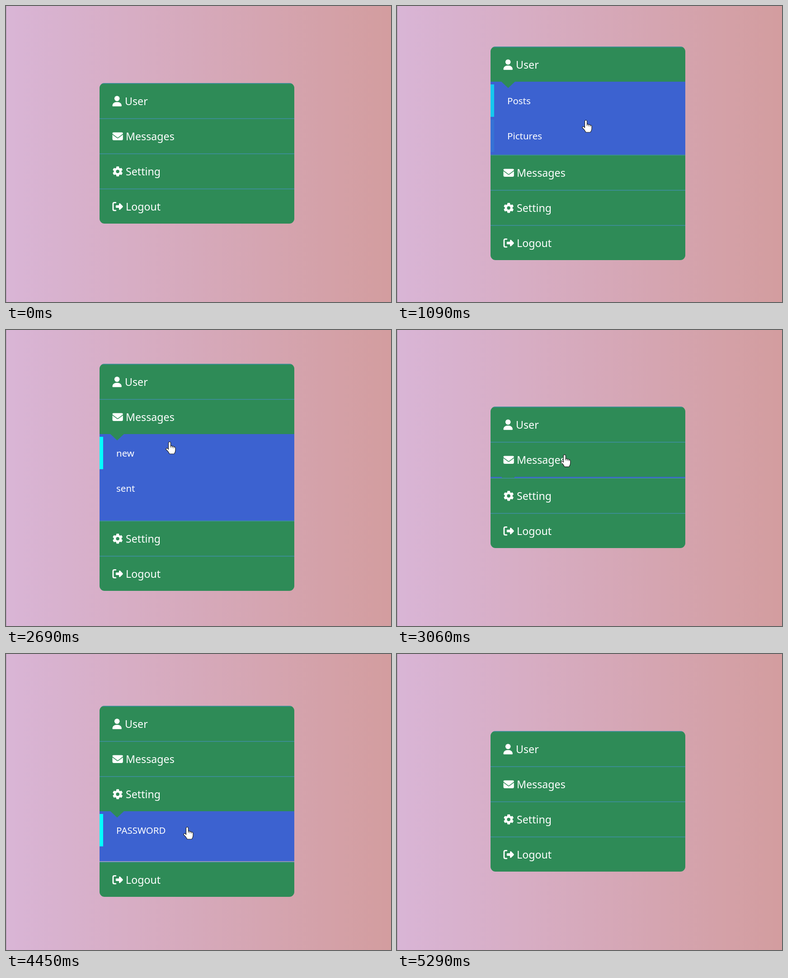
Recreate the animation shown at these times as an HTML page with a canvas. Size 852 px wide and 657 px high, loop 6.07 s.

```html
<!DOCTYPE html>
<html lang="en">
<head>
<meta charset="utf-8">
<title>Accordion menu</title>
<style>
  html, body { margin: 0; width: 100%; height: 100%; overflow: hidden; }
  canvas { display: block; }
</style>
</head>
<body>
<canvas id="stage" width="852" height="657"></canvas>
<script>
const ctx = document.getElementById('stage').getContext('2d');
const LOOP = 6070, STEP = 10;
const LEFT = 207, WIDTH = 431, MIDDLE = 327, ROW = 78;
const MAX_HEIGHT = 230, SLIDE = 500, FADE = 200, GAP = 6;
const GREEN = '#2e8b57', BLUE = '#3c62d0', LINE = '#4190aa';

const menu = [
  { label: 'User', icon: drawUser, textX: 263, items: ['Posts', 'Pictures'], open: 720, close: 1675 },
  { label: 'Messages', icon: drawEnvelope, textX: 265, items: ['new', 'sent', 'spam'], open: 1675, close: 2622 },
  { label: 'Setting', icon: drawGear, textX: 265, items: ['PASSWORD', 'LANGUAGE'], open: 3592, close: 4300 },
  { label: 'Logout', icon: drawExit, textX: 265, items: [], open: 0, close: 0 }
];

// Pointer hot spot: time, x, y
const pointerPath = [
  [120, 714, 613], [680, 423, 203], [900, 423, 210], [1040, 418, 248], [1090, 418, 253],
  [1130, 418, 262], [1500, 438, 381], [2000, 438, 381], [2520, 362, 248], [2900, 362, 248],
  [3560, 398, 365], [3680, 402, 380], [3710, 406, 405], [3850, 406, 402], [4250, 401, 384],
  [4700, 401, 384], [5140, 531, 518], [5290, 800, 695]
];

const hand = new Path2D('M-2.5 2Q0-2 2.5 2V10Q4.500 7.500 6 10.500Q8.500 9 9.500 11.500Q12 10.500 13 14V19Q13 23 10 27H0Q-3 21-8 17Q-7.500 13-4 15L-2.500 17Z');
const arrow = new Path2D('M0 0V20L4.500 16L8 24L11.500 22.500L8.500 15H14Z');
const userBody = new Path2D('M178 304C80 304 0 384 0 482Q0 512 30 512H418Q448 512 448 482C448 384 368 304 270 304Z');
const flap = new Path2D('M48 64C21 64 0 85 0 112Q0 136 19 150L237 314Q256 326 275 314L493 150Q512 136 512 112C512 85 490 64 464 64Z');
const envelope = new Path2D('M0 176V384Q0 448 64 448H448Q512 448 512 384V176L294 339Q256 365 218 339Z');
const exitArrow = new Path2D('M320 192V130Q324 96 354 96Q368 97 378 106L501 229Q522 256 501 283L378 406Q368 415 354 416Q324 416 320 382V320H192Q160 320 160 288V224Q160 192 192 192Z');
const bracket = new Path2D('M160 64H96Q32 64 32 128V384Q32 448 96 448H160');

const clamp = v => Math.max(0, Math.min(1, v));

// cubic-bezier(.25, .1, .25, 1)
function ease(x) {
  x = clamp(x);
  let lo = 0, hi = 1;
  for (let i = 0; i < 20; i++) {
    const s = (lo + hi) / 2, r = 1 - s;
    if (.75 * s * r * r + .75 * s * s * r + s ** 3 < x) lo = s; else hi = s;
  }
  return .3 * lo * (1 - lo) ** 2 + 3 * lo * lo * (1 - lo) + lo ** 3;
}

function layout(t) {
  const heights = menu.map(m => {
    if (!m.items.length) return 0;
    const grown = ease((t - m.open) / SLIDE) - ease((t - m.close) / SLIDE);
    return Math.min(GAP + ROW * m.items.length, MAX_HEIGHT * grown);
  });
  const total = heights.reduce((a, b) => a + b, ROW * menu.length);
  let y = MIDDLE - total / 2;
  return heights.map(height => {
    const row = { top: Math.round(y), height: Math.round(height) };
    y += ROW + height;
    return row;
  });
}

function pointerAt(t) {
  const i = pointerPath.findIndex(p => p[0] > t);
  if (i < 1) return null;
  const [a, b] = [pointerPath[i - 1], pointerPath[i]];
  const k = (t - a[0]) / (b[0] - a[0]);
  return { x: a[1] + (b[1] - a[1]) * k, y: a[2] + (b[2] - a[2]) * k };
}

// Returns [row, item] under the pointer; item is -1 on a heading
function hoverAt(rows, p) {
  if (!p || p.x < LEFT || p.x > LEFT + WIDTH) return null;
  for (let r = 0; r < rows.length; r++) {
    const y = p.y - rows[r].top;
    if (y < 0 || y >= ROW + rows[r].height) continue;
    if (y < ROW) return [r, -1];
    const inner = y - ROW - GAP;
    return inner >= 0 && inner % ROW < ROW - GAP ? [r, Math.floor(inner / ROW)] : null;
  }
  return null;
}

// Strength of each item's bar at every step of the loop
const fades = [];
let level = menu.map(m => m.items.map(() => 0));
for (let t = 0; t < LOOP; t += STEP) {
  const hit = hoverAt(layout(t), pointerAt(t));
  level = level.map((row, r) => row.map((v, i) =>
    clamp(v + (hit && hit[0] === r && hit[1] === i ? STEP : -STEP) / FADE)));
  fades.push(level);
}

function rect(color, x, y, w, h) {
  ctx.fillStyle = color;
  ctx.fillRect(x, y, w, h);
}

function disc(color, x, y, r) {
  ctx.fillStyle = color;
  ctx.beginPath();
  ctx.arc(x, y, r, 0, 7);
  ctx.fill();
}

function text(s, x, y, size) {
  ctx.font = `${size}px "Noto Sans", sans-serif`;
  ctx.fillStyle = '#fff';
  ctx.fillText(s, x, y);
}

// Icons live in a 512-unit box
function drawUser() {
  disc('#fff', 224, 128, 128);
  ctx.fill(userBody);
}

function drawEnvelope() {
  ctx.fill(flap);
  ctx.fill(envelope);
}

function drawGear() {
  ctx.translate(256, 256);
  disc('#fff', 0, 0, 190);
  for (let i = 0; i < 6; i++) {
    ctx.beginPath();
    ctx.roundRect(-66, -246, 132, 150, 30);
    ctx.fill();
    ctx.rotate(Math.PI / 3);
  }
  disc(GREEN, 0, 0, 82);
}

function drawExit() {
  ctx.fill(exitArrow);
  ctx.lineWidth = 64;
  ctx.lineCap = 'round';
  ctx.strokeStyle = '#fff';
  ctx.stroke(bracket);
}

function drawHeading(m, top) {
  rect(GREEN, LEFT, top, WIDTH, ROW + 1);
  rect(LINE, LEFT, top + .3, WIDTH, 1.4);
  ctx.save();
  ctx.translate(235.5, top + 28.5);
  ctx.scale(.0455, .0455);
  ctx.fillStyle = '#fff';
  m.icon();
  ctx.restore();
  text(m.label, m.textX, top + 48.5, 23.2);
}

function drawItems(m, row, bars) {
  const top = row.top + ROW;
  ctx.save();
  ctx.beginPath();
  ctx.rect(LEFT, top, WIDTH, row.height);
  ctx.clip();
  rect(BLUE, LEFT, top, WIDTH, row.height);
  m.items.forEach((label, i) => {
    const y = top + GAP + i * ROW;
    rect(`rgba(0,255,255,${bars[i]})`, LEFT, y, 8, ROW - GAP);
    text(label, 244, y + 43.5, 20.5);
  });
  ctx.fillStyle = GREEN;
  ctx.beginPath();
  ctx.moveTo(231, top);
  ctx.lineTo(261, top);
  ctx.lineTo(246, top + 14);
  ctx.fill();
  ctx.restore();
}

function drawPointer(p, shape) {
  ctx.save();
  ctx.translate(p.x, p.y);
  ctx.fillStyle = '#fff';
  ctx.strokeStyle = '#222';
  ctx.lineWidth = 1.2;
  ctx.lineJoin = 'round';
  ctx.fill(shape);
  ctx.stroke(shape);
  if (shape === hand) {
    ctx.lineWidth = 1;
    ctx.stroke(new Path2D('M2.500 9V13M6 10.500V14M9.500 11.500V14.500'));
  }
  ctx.restore();
}

const backdrop = ctx.createLinearGradient(0, 0, 852, 0);
backdrop.addColorStop(0, '#d9b5d6');
backdrop.addColorStop(1, '#d39d9f');

function draw(t) {
  const rows = layout(t), pointer = pointerAt(t);
  const bars = fades[Math.floor(t / STEP)];
  const last = rows[rows.length - 1];
  rect(backdrop, 0, 0, 852, 657);
  rect('#a894ab', 0, 0, 1, 657);

  ctx.save();
  ctx.beginPath();
  ctx.roundRect(LEFT, rows[0].top, WIDTH, last.top + ROW - rows[0].top, 11);
  ctx.clip();
  menu.forEach((m, i) => {
    drawHeading(m, rows[i].top);
    if (rows[i].height) drawItems(m, rows[i], bars[i]);
  });
  ctx.restore();

  if (pointer) drawPointer(pointer, hoverAt(rows, pointer) ? hand : arrow);
}

function tick() {
  draw(performance.now() % LOOP);
  requestAnimationFrame(tick);
}
tick();
</script>
</body>
</html>
```
